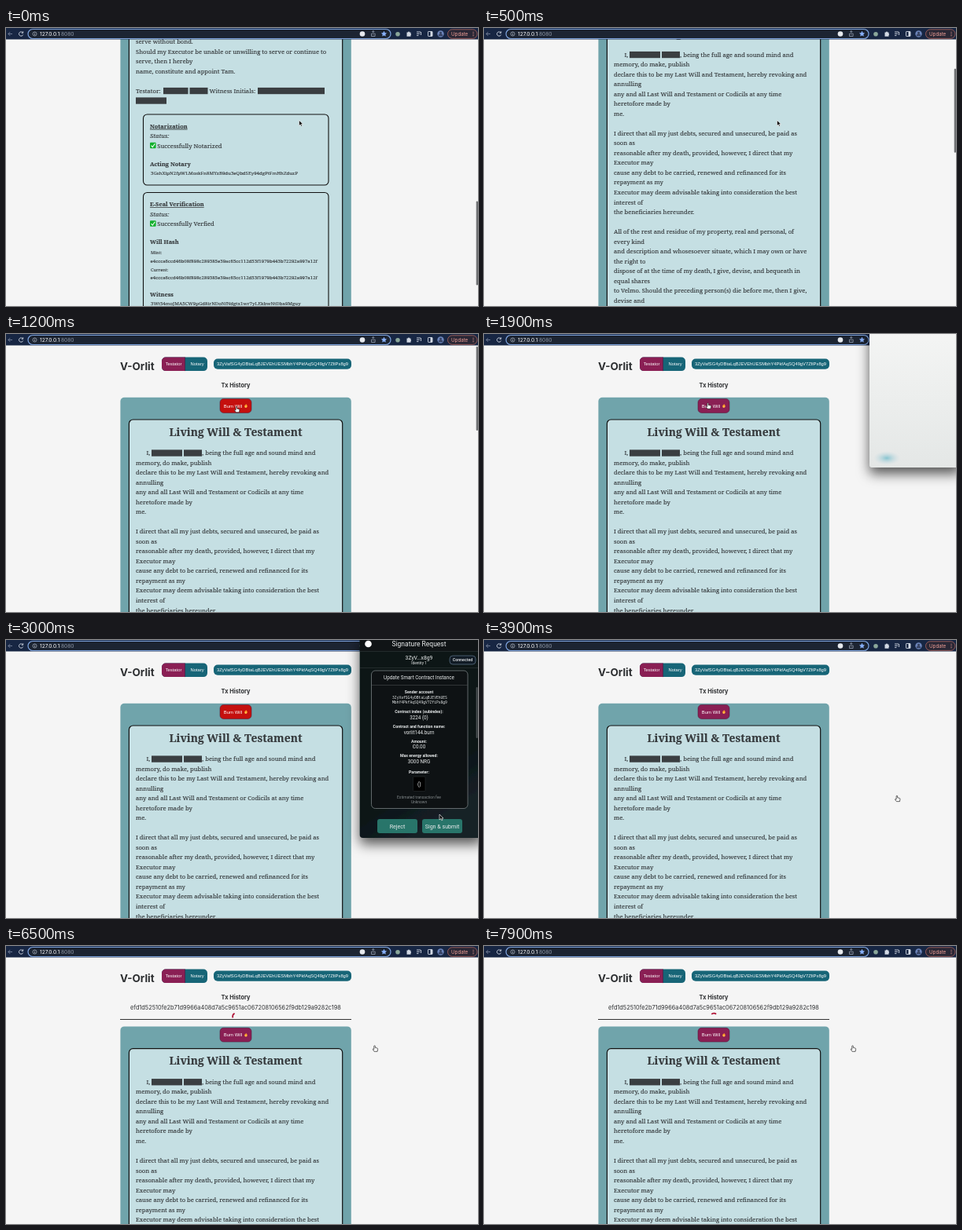
Recreate the animation shown at these times as an HTML page. Size 600 by 354 pixels, loop 8000 ms.

```html
<!DOCTYPE html>
<html lang="en">
<head>
<meta charset="utf-8">
<title>Will signing demo</title>
<style>
  html, body { margin: 0; width: 100%; height: 100%; overflow: hidden; background: #f5f5f5; }
  svg { display: block; width: 600px; height: 354px; }
  text { white-space: pre; }
  .serif { font-family: "Noto Serif", serif; font-size: 7.65px; fill: #35393c; stroke: #35393c; stroke-width: .14px; }
  .hash { font-size: 6.1px; }
  .small { font-size: 5.6px; }
  .bold { font-weight: 700; font-size: 7.4px; }
  .under { text-decoration: underline; }
  .italic { font-style: italic; }
  .title { font-size: 13.85px; font-weight: 700; text-anchor: middle; }
  .sans { font-family: Inter, sans-serif; font-size: 7.35px; fill: #2d2f31; }
  .mid { text-anchor: middle; }
  .button { font-family: "Liberation Sans", Arial, sans-serif; font-size: 5.8px; fill: #fff; }
  .wallet { font-family: Roboto, sans-serif; font-size: 6.3px; fill: #e8ebec; text-anchor: middle; }
  .mono { font-family: "Noto Sans Mono", monospace; font-size: 4.66px; }
</style>
</head>
<body>
<svg id="stage" viewBox="0 0 600 354" xmlns="http://www.w3.org/2000/svg"></svg>
<script>
const LOOP = 8000, STEP = 100;
const MAROON = '#8a1f54', TEAL = '#176577', RED = '#c5100e', INK = '#3a3e41';
const ADDRESS = '3ZyVafSG4yDBtaLqBJEVEhUESMbhY4PkfAqSQ49gV7ZfiPx8g9';
const WILL_HASH = 'e4ccca6ccd46b08f898c289385e39ac65cc112d53f1979b443b72292a997a12f';
const LINE = 12.52, CARDS_Y = 672.4;

const will = `I,
memory, do make, publish
declare this to be my Last Will and Testament, hereby revoking and
annulling
any and all Last Will and Testament or Codicils at any time
heretofore made by
me.

I direct that all my just debts, secured and unsecured, be paid as
soon as
reasonable after my death, provided, however, I direct that my
Executor may
cause any debt to be carried, renewed and refinanced for its
repayment as my
Executor may deem advisable taking into consideration the best
interest of
the beneficiaries hereunder.

All of the rest and residue of my property, real and personal, of
every kind
and description and whosesoever situate, which I may own or have
the right to
dispose of at the time of my death, I give, devise, and bequeath in
equal shares
to Velmo. Should the preceding person(s) die before me, then I give,
devise and
bequeath the said property to the survivors in equal shares.

If any beneficiary should fail to survive me by thirty days, then
it shall be
deemed that such person has died before me and the gift
shall pass as
part of the residue of my estate.

I direct that all taxes payable by reason of my death be paid
out of the
residue of my estate as an expense of its administration
and without
apportionment among the beneficiaries.

I hereby name, constitute and appoint the person below as
Executor of this
my Last Will and Testament, and direct that my Executor shall
serve without bond.
Should my Executor be unable or unwilling to serve or continue to
serve, then I hereby
name, constitute and appoint Tam.

Testator:`.split('\n');

const escapeText = s => s.replace(/&/g, '&amp;');
const text = (x, y, s, cls, extra = '') => `<text x="${x}" y="${y}" class="${cls}" ${extra}>${escapeText(s)}</text>`;
const box = (x, y, w, h, fill, r = 0, extra = '') =>
  `<rect x="${x}" y="${y}" width="${w}" height="${h}" rx="${r}" fill="${fill}" ${extra}/>`;
const dot = (x, y, r, fill, extra = '') => `<circle cx="${x}" cy="${y}" r="${r}" fill="${fill}" ${extra}/>`;
const path = (d, stroke, width = 1, fill = 'none') =>
  `<path d="${d}" fill="${fill}" stroke="${stroke}" stroke-width="${width}"/>`;
const redact = (x, y, w) => box(x, y, w, 8.3, INK);
const outline = (color, width = 1) => `stroke="${color}" stroke-width="${width}"`;

function status(y, heading, result) {
  return text(183, y, heading, 'serif bold under')
    + text(183, y + 12.4, 'Status:', 'serif italic')
    + box(183, y + 18, 7.6, 7.6, '#13b02d', 1)
    + path(`M184.6 ${y + 22}l1.7 2 3-4.4`, '#fff', 1.1)
    + text(192.3, y + 24.9, result, 'serif');
}

function cards() {
  const frame = outline('#111', 1.1);
  return `<g transform="translate(0 ${CARDS_Y})">`
    + redact(200, 75.9, 31.5) + redact(233.5, 75.9, 23)
    + text(258.5, 82.6, 'Witness Initials:', 'serif')
    + redact(320, 75.9, 85) + redact(165, 88.4, 39)
    + box(174.5, 110, 235.5, 90, 'none', 5, frame)
    + status(127.7, 'Notarization', 'Successfully Notarized')
    + text(183, 176, 'Acting Notary', 'serif bold')
    + text(184, 187.2, '3GshXipN2fpWLMoskFn8MYzB9du3eQbdSEy94dgPtFmHhZduzP', 'serif hash')
    + box(174.5, 209.5, 235.5, 164, 'none', 5, frame)
    + status(227.2, 'E-Seal Verification', 'Successfully Verfied')
    + text(183, 275.3, 'Will Hash', 'serif bold')
    + text(184, 287.6, 'Mint:', 'serif small')
    + text(183.5, 298.7, WILL_HASH, 'serif hash')
    + text(184, 309.6, 'Current:', 'serif small')
    + text(183.5, 320.3, WILL_HASH, 'serif hash')
    + text(183, 342.2, 'Witness', 'serif bold')
    + text(184, 353.4, '3Wt54moJMA5CW9pGd8irNDoNfNdgtx1wr7yLEkbwNtDba9Mguy', 'serif hash')
    + '</g>';
}

function documentBox() {
  return box(145.4, 80.7, 293.4, 990, '#70a4ab', 5)
    + box(272, 82.6, 40, 17.8, MAROON, 4.5, 'id="burn" stroke="#4a1030" stroke-width=".5"')
    + text(276.8, 93.6, 'Burn Will', 'button')
    + path('M305 89q2.4 2 1.7 3.8-.6 1.2-1.9 1.1-1.8-.1-1.7-2 .2-.9.9-1.3 1-.6 1-1.6z', 'none', 0, '#ff9f2a')
    + dot(304.9, 92.8, 0.7, '#ffe07a')
    + box(156.4, 109, 271.3, 945, '#c5dfe3', 5, outline('#111', 1.2))
    + text(292, 129.5, 'Living Will & Testament', 'serif title')
    + will.map((line, i) => line && text(i ? 165 : 178.5, 154.2 + i * LINE, line, 'serif')).join('')
    + redact(185, 147.4, 39) + redact(226, 147.4, 23)
    + text(249.3, 154.2, ', being the full age and sound mind and', 'serif')
    + cards();
}

function header() {
  return text(145, 46.3, 'V-Orlit', 'sans', 'style="font-size:13.4px;font-weight:700"')
    + box(198, 29.6, 58, 17.5, TEAL, 5)
    + path('M203 29.6h24.5v17.5h-24.5a5 5 0 0 1-5-5v-7.5a5 5 0 0 1 5-5z', 'none', 0, MAROON)
    + path('M227.5 29.6v17.5', '#4a1840', 0.6)
    + text(202.7, 40.2, 'Testator', 'button') + text(234.5, 40.2, 'Notary', 'button')
    + box(264, 31.6, 175, 13.2, TEAL, 5, 'id="pill"')
    + text(351.5, 40.3, ADDRESS, 'button mid')
    + text(292, 68.3, 'Tx History', 'sans mid', 'font-weight="700"')
    + '<g id="receipt">'
    + text(292, 80.7, 'efd1d52510fe2b71d9966a408d7a5c9651ac067208106562f9db129a9282c198', 'sans mid')
    + path('M145 93.5H439', '#333', 1.1)
    + `<g id="spinner">${path('M-2.9 -2.9A4.1 4.1 0 0 1 2.9 -2.9', '#b01638', 1.8)}</g></g>`;
}

function toolbar() {
  const light = '#d2d9e4', coral = '#f3a097';
  return box(0, 0, 600, 14.5, '#172643')
    + path('M8 7.5H3M5.3 5L2.8 7.5 5.3 10', '#76839b', 0.9)
    + path('M21.4 6a2.7 2.7 0 1 0 .3 2.5M21.7 4.3v2h-2', light, 0.9)
    + box(28, 1.5, 461, 12, '#1c2432', 6, outline('#7ea4df', 1.2))
    + dot(36.5, 7.5, 2.5, 'none', outline('#b8c0cc', 0.7)) + path('M36.5 7v2M36.5 5.7v.7', '#b8c0cc', 0.7)
    + '<text x="43" y="9.9" class="sans" style="font-size:6.6px;fill:#fff">127.0.0.1<tspan fill="#8d97a6">:8080</tspan></text>'
    + dot(453, 7.5, 3.3, '#e6e9ed')
    + path('M465.5 7h-1v3.5h4.6V7h-1M466.8 8.7V3.7M465.3 5l1.5-1.5L468.3 5', '#a9b4c4', 0.7)
    + path('M480.5 3.8l1.1 2.3 2.5.3-1.8 1.7.5 2.5-2.3-1.2-2.3 1.2.5-2.5-1.8-1.7 2.5-.3z', 'none', 0, '#86aef5')
    + dot(498, 7.8, 2.8, '#8aa79a')
    + path('M509.5 5.5h1.5a1 1 0 0 1 2 0h1.5v1.8a1 1 0 0 1 0 1.8v1.6h-5z', 'none', 0, light)
    + path('M522 5h5M522 7.3h4M522 9.6h2.5M527.5 5v4', light, 0.9)
    + box(536.5, 4.5, 5.5, 6, 'none', 0.6, outline(light, 0.9)) + box(539.5, 4.5, 2.5, 6, light)
    + dot(552.5, 7.5, 4.2, '#6b83b8') + dot(552.5, 6.3, 1.5, '#34405f')
    + path('M549.7 10.3a2.8 2.8 0 0 1 5.6 0z', 'none', 0, '#34405f')
    + box(561.5, 1.8, 37.5, 11.6, '#2a2735', 5.8, outline('#b2665f', 0.8))
    + text(566, 9.8, 'Update', 'sans', `style="font-size:6.2px;fill:${coral}"`)
    + [5.3, 7.5, 9.7].map(y => dot(594, y, 0.6, coral)).join('');
}

function walletRequest() {
  const label = (y, s) => text(525, y, s, 'wallet', 'style="font-size:5.2px;font-weight:700"');
  const value = (y, s) => text(525, y, s, 'wallet');
  const faint = (y, s) => text(525, y, s, 'wallet', 'style="font-size:4.9px;fill:#858b8d"');
  const action = (x, s) => box(x, 228, 51, 18, '#28756a', 3)
    + text(x + 25.5, 239.8, s, 'wallet', 'style="font-size:7.1px"');
  return box(449.7, -6, 156, 258, 'url(#dark)', 4, 'filter="url(#shadow)"')
    + box(449.7, 0, 151, 14, '#101416')
    + dot(460.5, 5, 4.3, '#fff')
    + text(525, 7.8, 'Signature Request', 'wallet', 'style="font-size:8.5px"')
    + path('M450 14.5H600M450 35.5H600', '#33393c', 0.6)
    + text(525, 24.7, '3ZyV...x8g9', 'wallet', 'style="font-size:6.8px"')
    + text(525, 31.3, 'Identity 1', 'wallet', 'style="font-size:4.8px"')
    + box(564, 20, 33, 11, '#111b25', 4, outline('#60788d', 0.7))
    + text(580.5, 27.3, 'Connected', 'wallet', 'style="font-size:5.3px;font-weight:500"')
    + box(464.5, 39, 122.5, 175.5, '#0e1214', 5, outline('#777e80', 0.8))
    + value(50.3, 'Update Smart Contract Instance')
    + path('M465 57.5H587', '#484e50', 0.6)
    + label(68.3, 'Sender account')
    + text(526, 74.8, ADDRESS.slice(0, 25), 'wallet mono') + text(526, 80.7, ADDRESS.slice(25), 'wallet mono')
    + label(93, 'Contract index (subindex):') + value(101, '3224 (0)')
    + label(112.2, 'Contract and function name:') + value(120.3, 'vorlit144.burn')
    + label(131, 'Amount:') + value(138.4, 'Ͼ0.00')
    + label(149.2, 'Max energy allowed:') + value(157.3, '3000 NRG')
    + label(169.6, 'Parameter:')
    + box(517.5, 174, 15.5, 18.5, '#000', 1, outline('#2b3032', 0.6))
    + text(525.3, 185.5, '()', 'wallet', 'style="font-size:7px"')
    + faint(201.7, 'Estimated transaction fee') + faint(207.5, 'Unknown')
    + action(472, 'Reject') + action(529, 'Sign & submit')
    + box(597.6, 60, 2, 65, '#4b5052', 1);
}

const stage = document.getElementById('stage');
stage.innerHTML = `<defs>
  <linearGradient id="dark" x1="0" y1="0" x2=".4" y2="1">
    <stop offset="0" stop-color="#101416"/><stop offset=".8" stop-color="#0f1518"/><stop offset="1" stop-color="#132026"/>
  </linearGradient>
  <linearGradient id="light" x1="0" y1="0" x2="0" y2="1">
    <stop offset="0" stop-color="#f4f5f4"/><stop offset="1" stop-color="#e4e7e6"/>
  </linearGradient>
  <radialGradient id="glow"><stop offset="0" stop-color="#86c4d0"/><stop offset="1" stop-color="#c9dbe2" stop-opacity="0"/></radialGradient>
  <filter id="shadow" x="-30%" y="-20%" width="160%" height="150%">
    <feDropShadow dx="0" dy="8" stdDeviation="8" flood-opacity=".65"/>
  </filter></defs>
  ${box(0, 0, 600, 354, '#f5f5f5')}
  <g id="page">${header()}<g id="doc">${documentBox()}</g></g>
  ${box(597.7, 16, 2.3, 107, '#6f7173', 1.2, 'id="thumb"')}
  ${toolbar()}
  <g id="opening">${box(490, -6, 116, 176, 'url(#light)', 4, 'filter="url(#shadow)"')}
    <ellipse cx="512" cy="158" rx="17" ry="9" fill="url(#glow)"/></g>
  <g id="wallet">${walletRequest()}</g>
  <g id="arrow">${path('M0 0v7l1.7-1.5 1.1 2.3 1.2-.6-1.1-2.2h2.2z', '#fff', 0.6, '#111')}</g>
  <g id="hand">${path('M-.7 .3q.8-.9 1.5 0v2.2l2.5.5q1 .3.8 1.5l-.5 2.8h-4l-2-2.7q.2-1 1.7 0z', '#222', 0.7, '#fff')}</g>`;

const part = {};
stage.querySelectorAll('[id]').forEach(el => part[el.id] = el);

const scrollKeys = [[0, 672.4], [100, 632], [200, 520], [300, 370], [400, 228], [500, 117.5],
  [600, 40], [700, 2], [800, -7], [1000, -7], [1200, 0]];
const cursorKeys = [[500, 372.5, 117.5], [800, 304, 98.5], [1300, 290, 91], [1900, 284.5, 88],
  [2200, 310, 105], [2800, 551, 222], [3100, 551, 222], [3300, 553, 234], [3700, 553, 234], [4300, 468.5, 127]];

function sample(keys, t) {
  if (t <= keys[0][0]) return keys[0].slice(1);
  const i = keys.findIndex(key => key[0] > t);
  if (i < 0) return keys[keys.length - 1].slice(1);
  const a = keys[i - 1], b = keys[i], f = (t - a[0]) / (b[0] - a[0]);
  return a.slice(1).map((v, n) => v + (b[n + 1] - v) * f);
}

const within = (t, from, to) => t >= from && t < to;
const show = (el, on) => el.setAttribute('display', on ? 'inline' : 'none');
const move = (el, x, y, more = '') => el.setAttribute('transform', `translate(${x} ${y}) ${more}`);

function render(t) {
  const [scroll] = sample(scrollKeys, t);
  const [x, y] = sample(cursorKeys, t);
  const confirmed = t >= 4000;
  const overButton = within(t, 700, 1900) || within(t, 2000, 3700);
  const pointing = within(t, 700, 2100) || t >= 3300;

  move(part.page, 0, -scroll);
  move(part.doc, 0, confirmed ? 21.7 : 0);
  move(part.thumb, 0, Math.max(0, scroll) * 0.304);
  show(part.thumb, t < 1700);
  show(part.receipt, confirmed);
  move(part.spinner, 292.2, 89.7, `rotate(${225 + (t - 5100) / 1180 * 360})`);
  part.burn.setAttribute('fill', overButton ? RED : MAROON);
  part.pill.setAttribute('fill', t < 1000 ? MAROON : TEAL);
  show(part.opening, within(t, 1900, 2000));
  show(part.wallet, within(t, 2000, 3700));
  show(part.arrow, !pointing);
  show(part.hand, pointing);
  move(part.arrow, x, y);
  move(part.hand, x, y);
}

const start = performance.now();
function tick() {
  const elapsed = (performance.now() - start) % LOOP;
  render(Math.floor(elapsed / STEP) * STEP);
  requestAnimationFrame(tick);
}
tick();
</script>
</body>
</html>
```
